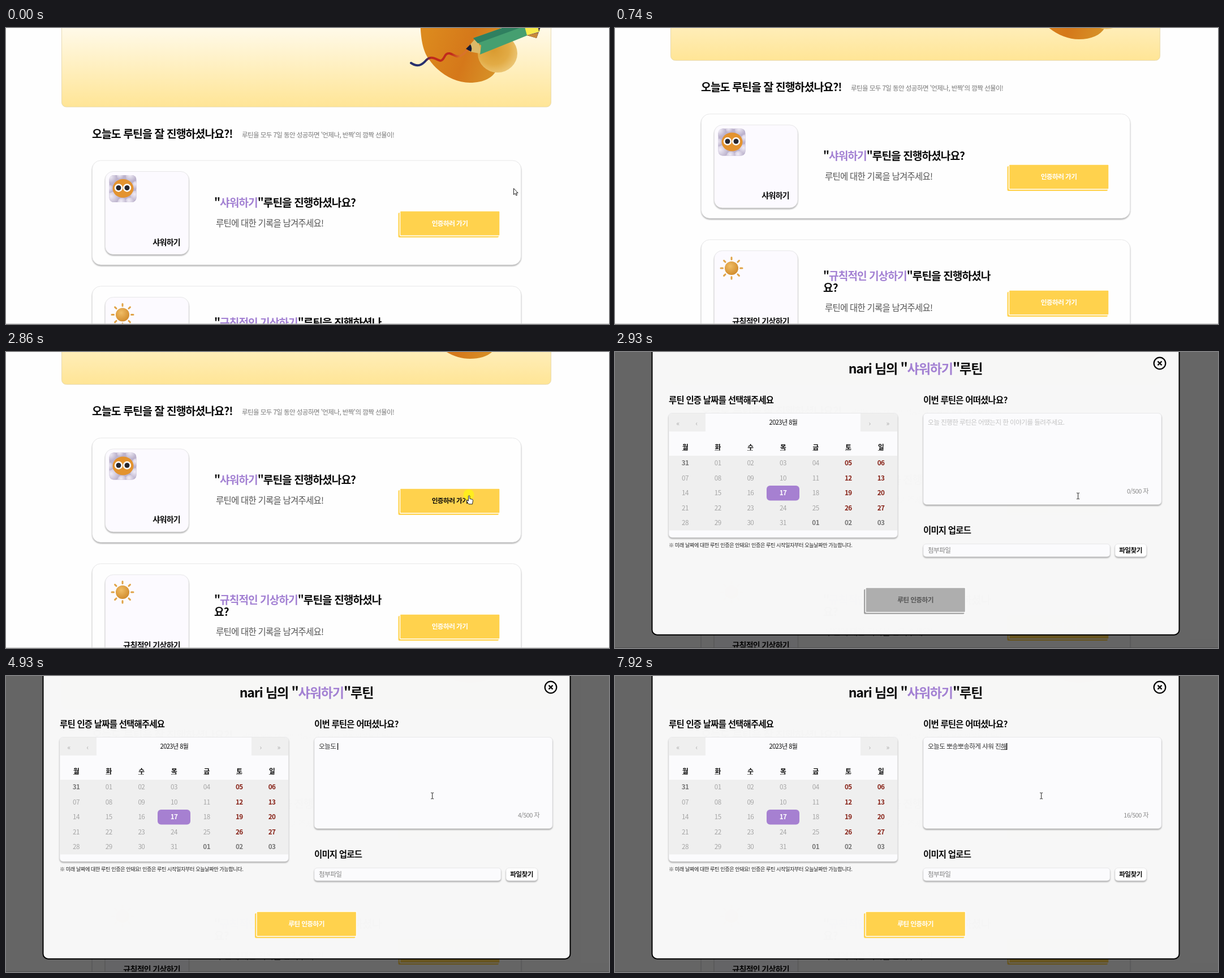
An HTML page for the animation above (7.99 s loop, 1066 by 525 pixels).

```html
<!DOCTYPE html>
<html lang="ko">
<head>
<meta charset="utf-8">
<title>루틴 인증</title>
<style>
  html, body { margin: 0; width: 100%; height: 100%; overflow: hidden; background: #fefefe; }
  svg { display: block; width: 1066px; height: 525px; }
  text { font-family: "Noto Sans CJK KR", "Noto Sans CJK", "Noto Sans", sans-serif; letter-spacing: -.05em; white-space: pre; }
  .lift { filter: drop-shadow(0 2.5px 1.2px rgba(0, 0, 0, .3)); }
  .purple { fill: #a381d3; }
</style>
</head>
<body>
<svg id="stage" viewBox="0 0 1066 525"></svg>
<script>
const LOOP = 7990;
const YELLOW = '#ffd24d';
const INK = '#0a0a0a';

// Text placed by the middle of its line
const text = (x, cy, size, str, { fill = INK, weight = 400, anchor = 'start', id = '' } = {}) =>
  `<text x="${x}" y="${cy + size * .38}" font-size="${size}" font-weight="${weight}" fill="${fill}" text-anchor="${anchor}" id="${id}">${str}</text>`;
const bold = (x, cy, size, str, opts) => text(x, cy, size, str, { weight: 700, ...opts });
const rect = (x, y, w, h, fill, r = 0, extra = '') =>
  `<rect x="${x}" y="${y}" width="${w}" height="${h}" rx="${r}" fill="${fill}" ${extra}/>`;
const circle = (x, y, r, fill, extra = '') => `<circle cx="${x}" cy="${y}" r="${r}" fill="${fill}" ${extra}/>`;
const path = (d, fill, extra = '') => `<path d="${d}" fill="${fill}" ${extra}/>`;
const lifted = (x, y, w, h, fill, r) => rect(x, y, w, h, fill, r, 'class="lift" stroke="#e2e2e4" stroke-width=".8"');

const button = (x, y, label, id) => `<g id="${id}">
  ${rect(x - 3.5, y + 2, 177.5, 44, YELLOW, 2)}
  ${rect(x - .5, y - 1, 176.5, 44, YELLOW, 1.5, 'stroke="#fff" stroke-width="1.4"')}
  ${bold(x + 87.5, y + 21, 11.7, label, { fill: '#fff', anchor: 'middle' })}</g>`;

const eyes = [199, 214].map(x => circle(x, 201, 7.2, '#fff') + circle(x, 201, 4.5, '#26262e')).join('');
const balls = [[186, 184, 9], [202, 180, 6], [221, 181, 9], [230, 196, 7], [229, 215, 9], [219, 226, 8],
  [205, 227, 8], [188, 219, 11], [183, 203, 7]].map(b => circle(...b, 'url(#ball)')).join('');
const showerIcon = `<g clip-path="url(#iconBox)">${rect(182, 178, 49, 49, '#bdb3cd')}${balls}
  <ellipse cx="207" cy="202" rx="18.5" ry="16.5" fill="#e3932f"/>${eyes}</g>`;

const rays = Array.from({ length: 8 }, (_, i) =>
  `<path d="M0-15.5V-19" stroke="#e0a347" stroke-width="3" stroke-linecap="round" transform="translate(206 203) rotate(${i * 45})"/>`).join('');
const sunIcon = rays + circle(206, 203, 12, 'url(#sun)');

const card = (y, icon, name, lines, noteY, id) => `<g transform="translate(0 ${y})">
  ${lifted(152.5, 152.5, 758, 185, '#fefefe', 15)}
  ${lifted(175.5, 172, 147.5, 147, '#fcfaff', 14)}
  ${icon}
  ${bold(308, 297, 14, name, { anchor: 'end' })}
  ${bold(368, lines.y, 19.15, `"<tspan class="purple">${name}</tspan>"${lines.first}`)}
  ${lines.rest ? bold(368, lines.y + 20.5, 19.15, lines.rest) : ''}
  ${text(371, noteY, 15.5, '루틴에 대한 기록을 남겨주세요!', { fill: '#555' })}
  ${button(697, 243, '인증하러 가기', id)}</g>`;

const art = `<g id="art">
  ${path('M733-60C730 12 735 38 748 56C766 82 794 97 820 97C845 97 862 88 868 72L880-60Z', 'url(#body)')}
  <ellipse cx="869" cy="45" rx="35" ry="34" fill="url(#foot)"/>
  ${path('M716 62C728 70 735 66 743 57C752 48 760 56 768 58C776 57 774 44 784 45C792 47 796 53 804 49C811 46 812 41 818 37', 'none', 'stroke="url(#ink)" stroke-width="4" stroke-linecap="round"')}
  ${path('M815 36L832 16L842 46L820 42Z', '#ddb968')}
  ${path('M813 37L821 29Q825 36 822 42Z', '#171a35')}
  ${path('M826 18L914-13L922 13L838 47L840 31Z', '#459f70')}
  ${path('M826 18L914-13L916-3L834 27Z', '#2f8060')}
  ${path('M914-13L938-20L944 6L921 13Z', '#f9ec4d')}
  ${path('M938-20L948-10L938 18L921 13L942 7Z', '#3c2c45')}
  ${path('M921 13L941 8L938 18Z', '#c98a3a')}</g>`;

const page = `<g id="page">
  <g clip-path="url(#bannerBox)">${rect(98.5, -160, 865, 217.5, 'url(#banner)', 8)}${art}</g>
  ${rect(98.5, -160, 865, 217.5, 'none', 8, 'stroke="#e3d3a6" stroke-width=".8"')}
  ${bold(152, 105, 19.45, '오늘도 루틴을 잘 진행하셨나요?!')}
  ${text(417, 107, 11.55, "루틴을 모두 7일 동안 성공하면 '언제나, 반짝'의 깜짝 선물이!", { fill: '#777' })}
  ${card(0, showerIcon, '샤워하기', { y: 227, first: '루틴을 진행하셨나요?' }, 263.5, 'go')}
  ${card(223, sunIcon, '규칙적인 기상하기', { y: 217, first: '루틴을 진행하셨나', rest: '요?' }, 273.5, 'go2')}
  </g>${rect(0, 524, 1066, 1, '#c8c8c8')}`;

const colX = i => 124 + 57.67 * i;
const weekdays = [...'월화수목금토일'].map((d, i) => bold(colX(i), 169, 11.7, d, { anchor: 'middle' }) +
  path(`M${colX(i) - 5} 174.5h10`, 'none', 'stroke="#222" stroke-dasharray="1.5 1"')).join('');
const days = Array.from({ length: 35 }, (_, i) => {
  const col = i % 7, cy = 196.5 + 26.6 * Math.floor(i / 7);
  const day = i === 0 ? 31 : (i - 1) % 31 + 1;
  const outside = i === 0 || i > 31, picked = i === 17;
  const fill = picked ? '#fff' : outside ? '#757575' : col > 4 ? '#862015' : '#a6a6a6';
  return (picked ? rect(268, 237, 58, 26.5, '#a680d1', 6) : '') +
    text(colX(col), cy, 11.7, String(day).padStart(2, '0'), { fill, anchor: 'middle', weight: outside || picked || col > 4 ? 700 : 500 });
}).join('');

const calendar = `${lifted(95, 108.5, 404.5, 220.5, '#fbfbfd', 6)}
  ${path('M160 109H101Q95.4 109 95.4 115V141H160ZM434 109H493Q499 109 499 115V141H434Z', '#efefef')}
  ${[[111, '«'], [144, '‹'], [450, '›'], [482, '»']].map(([x, s]) => text(x, 126, 12, s, { fill: '#aaa', anchor: 'middle' })).join('')}
  ${text(297.5, 125, 11.1, '2023년 8월', { anchor: 'middle', weight: 500 })}
  ${rect(95.4, 184, 403.7, 132.5, '#efefef')}${weekdays}${days}`;

const modal = `<g id="modal">
  ${rect(0, 0, 1066, 525, 'rgba(0,0,0,.6)')}
  ${rect(65.5, -20, 932, 521.7, 'rgba(250,250,250,.98)', 9, 'stroke="#000" stroke-width="2"')}
  ${bold(531, 29, 23.1, 'nari 님의 "<tspan class="purple">샤워하기</tspan>"루틴', { anchor: 'middle' })}
  ${circle(963, 20, 10.3, 'none', 'stroke="#000" stroke-width="2.2"')}
  ${path('M959.5 16.5l7 7m0-7l-7 7', 'none', 'stroke="#000" stroke-width="2.4"')}
  ${bold(95, 85, 15.45, '루틴 인증 날짜를 선택해주세요')}
  ${bold(545, 85, 15.45, '이번 루틴은 어떠셨나요?')}
  ${bold(545, 316, 15.45, '이미지 업로드')}
  ${calendar}
  ${text(95, 342.5, 9.2, '※ 미래 날짜에 대한 루틴 인증은 안돼요! 인증은 루틴 시작일자부터 오늘날짜만 가능합니다.', { fill: '#222' })}
  ${lifted(545, 108.5, 421, 162, '#fbfbfd', 6)}
  ${text(553, 125, 11.65, '오늘 진행한 루틴은 어땠는지 한 이야기를 들려주세요.', { fill: '#c4c4c4', id: 'hint' })}
  ${text(553, 125, 11.6, '', { fill: '#333', id: 'typed' })}
  ${rect(553, 130, 0, 1, '#333', 0, 'id="under"')}
  ${rect(553, 119, 1.2, 12, '#000', 0, 'id="caret"')}
  ${text(943, 247, 11, '', { fill: '#888', anchor: 'end', id: 'count' })}
  ${lifted(545, 340.5, 330, 22.5, '#fbfbfd', 5)}
  ${text(553, 352, 11.6, '첨부파일', { fill: '#808080' })}
  ${lifted(884, 340.5, 55.5, 22.5, '#fff', 5)}
  ${bold(911.5, 352, 11.7, '파일찾기', { anchor: 'middle' })}
  ${button(443.5, 418.8, '루틴 인증하기', 'send')}</g>`;

const outline = 'stroke="#222" stroke-width="1" stroke-linejoin="round"';
const cursors = `${circle(818, 253, 9.5, '#ffec1f', 'id="halo"')}
  <g id="arrow">${path('M0 0V11L2.6 8.8L4.4 12.6L6.1 11.8L4.4 8.1H7.6Z', '#fff', outline)}</g>
  <g id="hand">${path('M-1.2 0Q0-1.2 1.2 0V5L5.5 6Q7 6.4 6.8 8.5L5.8 14.5H-.6L-4.3 9Q-4.4 7-2.6 7.8L-1.2 9Z', '#fff', outline)}</g>
  <g id="beam">${path('M-2.5-5.3H-.6L0-4.7L.6-5.3H2.5M0-4.7V4.7M-2.5 5.3H-.6L0 4.7L.6 5.3H2.5', 'none', 'stroke="#222" stroke-width="1"')}</g>`;

const stops = list => list.map(([o, c]) => `<stop offset="${o}" stop-color="${c}"/>`).join('');
const defs = `<defs>
  <linearGradient id="banner" gradientUnits="userSpaceOnUse" x1="0" y1="-105" x2="0" y2="57">${stops([[0, '#fffdf6'], [1, '#ffe596']])}</linearGradient>
  <linearGradient id="body" x1="0" y1=".6" x2="1" y2="1">${stops([[0, '#dc8a1e'], [.5, '#d5781a'], [1, '#d79a2c']])}</linearGradient>
  <radialGradient id="foot" cx=".4" cy=".4" r=".65">${stops([[0, '#d99a2f'], [.6, '#e2ab45'], [1, '#ecc777']])}</radialGradient>
  <linearGradient id="ink">${stops([[0, '#27306e'], [.25, '#27306e'], [.35, '#c02a1c'], [.7, '#c02a1c'], [.85, '#d9732a']])}</linearGradient>
  <radialGradient id="ball" cx=".4" cy=".35" r=".7">${stops([[0, '#f0ecf6'], [1, '#b9afca']])}</radialGradient>
  <radialGradient id="sun" cx=".4" cy=".35" r=".7">${stops([[0, '#f0bd66'], [1, '#d08a2a']])}</radialGradient>
  <clipPath id="bannerBox">${rect(98, -160, 968, 217.5, '#000')}</clipPath>
  <clipPath id="iconBox">${rect(182.5, 178.5, 48, 48, '#000', 8)}</clipPath></defs>`;

const $ = id => document.getElementById(id);
$('stage').innerHTML = defs + page + modal + cursors;

// Piecewise linear value lists: [time, ...values]
function along(keys, t) {
  let i = keys.findIndex(k => k[0] > t);
  if (i < 0) return keys[keys.length - 1].slice(1);
  i = Math.max(i, 1);
  const [a, b] = [keys[i - 1], keys[i]], p = (t - a[0]) / (b[0] - a[0]);
  return a.slice(1).map((v, j) => v + (b[j + 1] - v) * p);
}
const BOB = [[0, 0], [700, 5.5], [1930, -2.5]];
const POINTER = [[0, 897.5, 284.5], [420, 897.5, 284.5], [560, 955, 322], [700, 1075, 432], [940, 1075, 432],
  [1200, 1009, 371], [1650, 830, 278], [1930, 819, 255], [3200, 818.5, 255.5], [3700, 753.7, 212.5]];

const SYLLABLES = [[4330, 'ㅇ'], [4400, '오'], [4530, '온'], [4600, '오느'], [4670, '오늘'], [4730, '오늘ㄷ'],
  [4800, '오늘도'], [4930, '오늘도 '], [5130, '오늘도 ㅃ'], [5330, '오늘도 뽀'], [5400, '오늘도 뽓'], [5460, '오늘도 뽀소'],
  [5660, '오늘도 뽀송'], [5730, '오늘도 뽀송ㅃ'], [5860, '오늘도 뽀송뽀'], [5930, '오늘도 뽀송뽓'],
  [6000, '오늘도 뽀송뽀소'], [6060, '오늘도 뽀송뽀송'], [6260, '오늘도 뽀송뽀송하']];
const base = '오늘도 뽀송뽀송하';
const ENDINGS = [[6730, '게'], [6930, '게 '], [7000, '게 ㅅ'], [7060, '게 샤'], [7130, '게 샹'], [7200, '게 샤우'],
  [7320, '게 샤워'], [7460, '게 샤워 '], [7530, '게 샤워 ㅈ'], [7660, '게 샤워 지'], [7790, '게 샤워 진'], [7920, '게 샤워 진해']];
const TYPING = SYLLABLES.concat(ENDINGS.map(([t, s]) => [t, base + s]));

const show = (id, on) => $(id).setAttribute('visibility', on ? 'visible' : 'hidden');
const move = (id, x, y) => $(id).setAttribute('transform', `translate(${x} ${y})`);

function drawTyping(t) {
  const entry = TYPING.filter(k => k[0] <= t).pop();
  const str = entry ? entry[1] : '', n = str.length, typed = $('typed');
  typed.textContent = str;
  const width = n ? typed.getComputedTextLength() : 0;
  const before = n > 1 ? typed.getSubStringLength(0, n - 1) : 0;
  $('under').setAttribute('x', 553 + before);
  $('under').setAttribute('width', n && !str.endsWith(' ') ? width - before : 0);
  $('caret').setAttribute('x', 553 + width);
  $('count').textContent = `${n}/500 자`;
  $('hint').style.display = n ? 'none' : '';
  show('caret', n || (t >= 3740 && t < 4270));
  const [back, front, label] = $('send').children;
  back.setAttribute('fill', n ? YELLOW : '#a0a0a0');
  front.setAttribute('fill', n ? YELLOW : '#aeaeae');
  label.setAttribute('fill', n ? '#fff' : '#555');
}

function draw(t) {
  const step = Math.floor(t / 70) * 70;
  const open = t >= 2930, hover = t >= 1740 && !open;
  move('page', 0, 82.5 * Math.max(0, 1 - step / 500) ** 2);
  move('art', 0, along(BOB, step)[0] - 82.5);
  $('go').lastElementChild.setAttribute('fill', hover ? INK : '#fff');
  const [x, y] = along(POINTER, step);
  for (const id of ['arrow', 'hand', 'beam']) move(id, x, y);
  show('arrow', t < 1740);
  show('hand', hover);
  show('beam', open);
  show('halo', t >= 2470 && !open);
  $('modal').style.display = open ? '' : 'none';
  if (open) drawTyping(t);
}

const start = performance.now();
function tick() {
  draw((performance.now() - start) % LOOP);
  requestAnimationFrame(tick);
}
tick();
</script>
</body>
</html>
```
